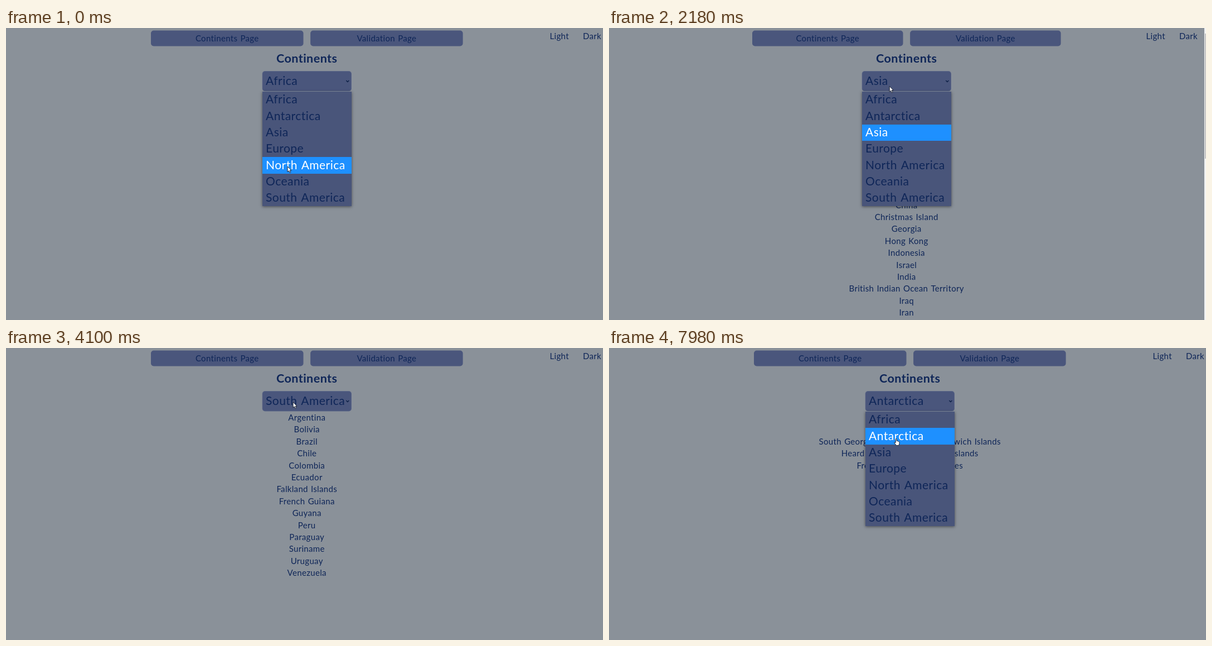
An HTML page with a canvas that plays this animation: 1071 px wide and 523 px high, repeating every 8 s.

```html
<!DOCTYPE html>
<html lang="en">
<head>
<meta charset="utf-8">
<title>Continents</title>
<style>
  html, body { margin: 0; width: 100%; height: 100%; overflow: hidden; background: #8a9199; }
  canvas { display: block; }
</style>
</head>
<body>
<canvas width="1071" height="523"></canvas>
<script>
const ctx = document.querySelector('canvas').getContext('2d');
const LOOP = 8000, ROW = 29.33, MENU_TOP = 113.9, MENU_WIDTH = 160;
const NAVY = '#0f2658', PANEL = '#49557a', BUTTON = '#4a567c';

const lists = {
  'Africa': '',
  'Antarctica': 'Antarctica|Bouvet Island|South Georgia and the South Sandwich Islands|' +
    'Heard Island and McDonald Islands|French Southern Territories',
  'Asia': 'United Arab Emirates|Afghanistan|Armenia|Azerbaijan|Bangladesh|Bahrain|Brunei|Bhutan|' +
    'Cocos [Keeling] Islands|China|Christmas Island|Georgia|Hong Kong|Indonesia|Israel|India|' +
    'British Indian Ocean Territory|Iraq|Iran',
  'Europe': '',
  'North America': 'Antigua and Barbuda|Anguilla|Aruba|Barbados|Saint Barthélemy|Bermuda|Bonaire|' +
    'Bahamas|Belize|Canada|Costa Rica|Cuba|Curacao|Dominica|Dominican Republic|Grenada|Greenland|' +
    'Guadeloupe|Guatemala',
  'Oceania': '',
  'South America': 'Argentina|Bolivia|Brazil|Chile|Colombia|Ecuador|Falkland Islands|French Guiana|' +
    'Guyana|Peru|Paraguay|Suriname|Uruguay|Venezuela'
};
const names = Object.keys(lists);
const thumbEnd = { 'North America': 287, 'Asia': 234 };

// time, selected continent, menu open
const clicks = [
  [0, 'Africa', true], [120, 'North America', false],
  [980, 'North America', true], [1640, 'Asia', false],
  [2060, 'Asia', true], [3280, 'South America', false],
  [6120, 'South America', true], [7980, 'Antarctica', true]
];

// time, x, y where the pointer rests or turns
const stops = [
  [0, 505, 248], [200, 502, 251], [690, 514, 99], [990, 514, 99], [1240, 509, 191],
  [1640, 508, 187], [1850, 503, 100], [2130, 503, 101], [2700, 514, 295], [3420, 514, 298],
  [4080, 515, 97], [6140, 515, 97], [6380, 510, 127], [6700, 510, 128], [6950, 513, 166],
  [7240, 513, 162], [LOOP, 513, 162]
];
const HAND_FROM = 7390;

// The pointer glides between stops but is seen only at regular samples.
function pointerAt(time) {
  const t = Math.max(0, 120 + Math.floor((time - 120) / 137) * 137);
  const i = stops.findLastIndex(stop => stop[0] <= t);
  const [t0, x0, y0] = stops[i], [t1, x1, y1] = stops[i + 1];
  const u = (t - t0) / (t1 - t0), ease = u * u * (3 - 2 * u);
  return [x0 + (x1 - x0) * ease, y0 + (y1 - y0) * ease];
}

function text(str, x, y, size = 15, color = NAVY, align = 'center', weight = 400) {
  ctx.font = `${weight} ${size}px Lato, "Open Sans", sans-serif`;
  ctx.letterSpacing = size * .022 + 'px';
  ctx.wordSpacing = '1px';
  ctx.textAlign = align;
  ctx.fillStyle = color;
  ctx.fillText(str, x, y);
}

function rect(x, y, w, h, color, radius = 0) {
  ctx.fillStyle = color;
  ctx.beginPath();
  ctx.roundRect(x, y, w, h, radius);
  ctx.fill();
}

function drawHeader(scrolls, mid) {
  const width = scrolls ? 270.5 : 273.5;
  const left = scrolls ? 257 : 260;
  ['Continents Page', 'Validation Page'].forEach((label, i) => {
    const x = left + i * (width + 12.6);
    rect(x, 4.5, width, 28, BUTTON, 5);
    text(label, x + width / 2, 23.5);
  });
  const shift = scrolls ? -12 : 0;
  text('Light', 975.5 + shift, 20, 15, NAVY, 'left');
  text('Dark', 1035 + shift, 20, 15, NAVY, 'left');
  text('Continents', mid, 62, 21.5, NAVY, 'center', 700);
}

function drawSelect(label, left) {
  rect(left - .4, 77, MENU_WIDTH + .4, 36.5, '#616c8a', 5);
  rect(left + .3, 77.7, MENU_WIDTH - 1, 35.1, BUTTON, 4.5);
  text(label, left + 6, 102, 21, NAVY, 'left');
  ctx.strokeStyle = '#0c1f45';
  ctx.lineWidth = 1.3;
  ctx.stroke(new Path2D(`M${left + 150.3} 94l2.5 2.5 2.5-2.5`));
}

function drawMenu(highlight, left) {
  ctx.save();
  ctx.shadowColor = 'rgba(0,0,0,.5)';
  ctx.shadowBlur = 5;
  ctx.shadowOffsetY = 1;
  rect(left, 114, MENU_WIDTH, 205, PANEL);
  ctx.restore();
  rect(left, 113.2, MENU_WIDTH, .8, '#7f889b');
  names.forEach((name, i) => {
    const y = MENU_TOP + i * ROW, top = Math.round(y), active = i === highlight;
    if (active) rect(left, top, MENU_WIDTH, Math.round(y + ROW) - top, '#1e90ff');
    text(name, left + 6, y + 21.3, 21, active ? '#fff' : NAVY, 'left');
  });
}

function drawPointer(x, y, hand) {
  const path = new Path2D(hand
    ? 'M1.2 1Q2.2-.5 3.2 1V4.6Q4.4 3.8 5 5Q6.2 4.5 6.6 5.6Q8 5.4 8 6.8V9.2L6.8 12.4H2.2L-1 8Q-1.3 6.4 .2 6.8L1.2 7.8Z'
    : 'M0 0V9.8L2.3 7.7 4 11.4 5.7 10.6 4.1 7.1H7Z');
  ctx.save();
  ctx.translate(x, y);
  ctx.lineJoin = 'round';
  ctx.lineWidth = 1;
  ctx.strokeStyle = '#1b2233';
  ctx.fillStyle = '#fff';
  ctx.fill(path);
  ctx.stroke(path);
  ctx.restore();
}

function draw(now) {
  const t = now % LOOP;
  const [, selected, open] = clicks.findLast(click => click[0] <= t);
  const [x, y] = pointerAt(t);
  const scrolls = selected in thumbEnd;
  const left = scrolls ? 454 : 460, mid = left + 79.7;

  rect(0, 0, 1071, 523, '#8a9199');
  drawHeader(scrolls, mid);
  lists[selected].split('|').forEach((name, i) => text(name, mid, 130 + i * 21.4));
  drawSelect(selected, left);
  if (open) {
    const hovered = Math.floor((y - MENU_TOP) / ROW);
    drawMenu(hovered < 0 ? names.indexOf(selected) : hovered, left);
  }
  if (scrolls) {
    rect(1068, 0, 3, 523, '#f1f1f1');
    rect(1069, 10, 2, thumbEnd[selected] - 10, '#c1c1c1');
  }
  drawPointer(x, y, t >= HAND_FROM);
  requestAnimationFrame(draw);
}
requestAnimationFrame(draw);
</script>
</body>
</html>
```
